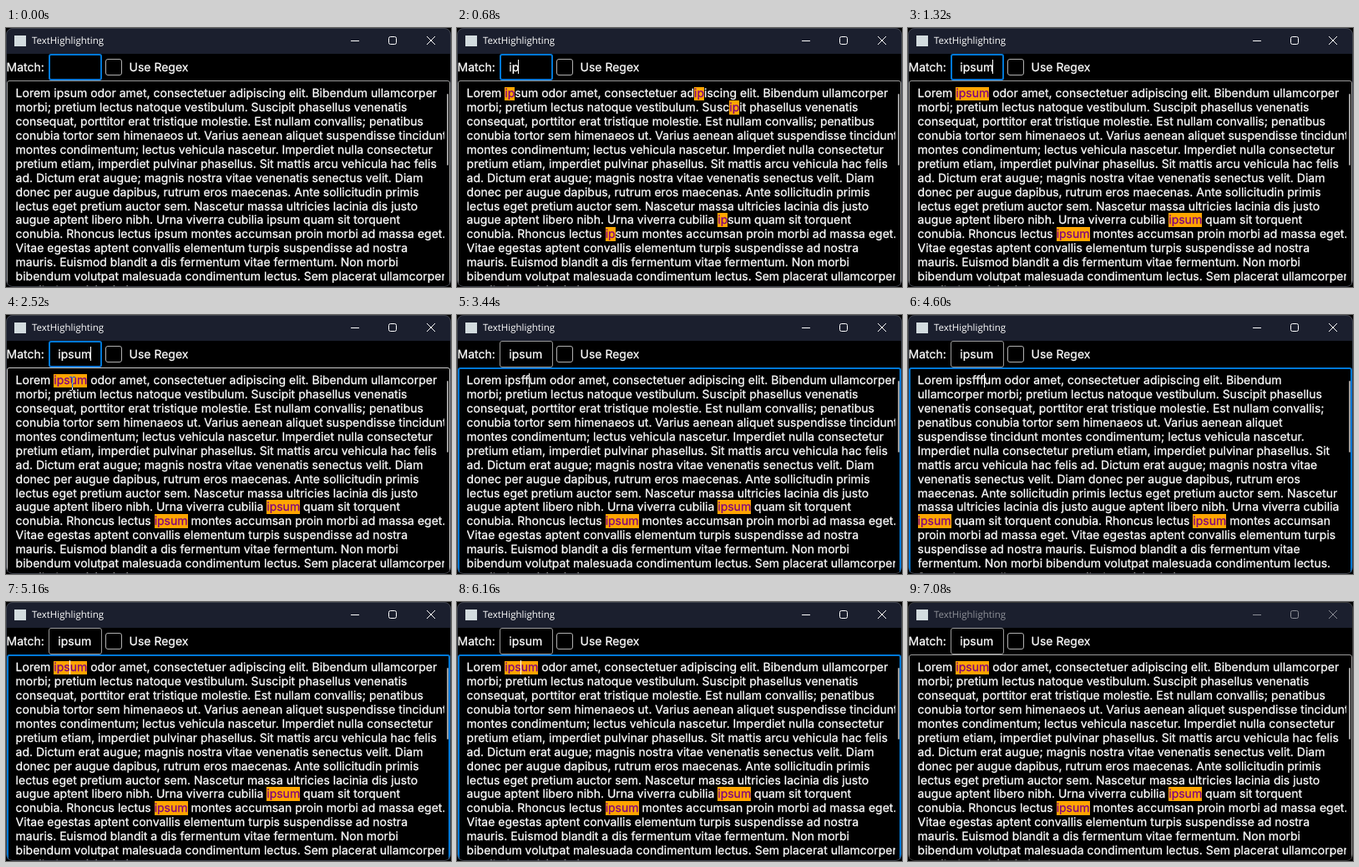
Animation of 533x311 px, one loop 7120 ms. Source, as an HTML page:

```html
<!DOCTYPE html>
<html lang="en">
<head>
<meta charset="utf-8">
<title>TextHighlighting</title>
<style>
html, body { margin: 0; width: 100%; height: 100%; overflow: hidden; background: #000; }
#win {
  position: relative; width: 533px; height: 311px; overflow: hidden; isolation: isolate;
  background: #000; color: #fff; font: 14px/17px Inter, sans-serif;
  text-rendering: geometricPrecision; white-space: pre; -webkit-text-stroke: .25px;
}
#win div, #win svg, pre { position: absolute; box-sizing: border-box; }
#bar { left: 0; top: 0; width: 533px; height: 31px; background: #1b1f2e; }
#icon { left: 10px; top: 9px; width: 14px; height: 13px; background: #d3dcdf; }
#title { left: 31px; top: 8px; font: 11.5px/16px "Open Sans", sans-serif; -webkit-text-stroke: 0; }
#buttons { left: 0; top: 0; fill: none; stroke: #fff; }
.field { border: 1px solid #999; border-radius: 3px; }
.hover { border-color: #ccc; }
.focus { border: 2px solid #0078d7; }
#box { left: 51px; top: 31px; width: 64px; height: 32px; }
#check { left: 119px; top: 37px; width: 20px; height: 20px; border-color: #b0b0b0; }
#editor { left: 1px; top: 63px; width: 531px; height: 260px; }
#thumb { left: 528px; top: 79px; width: 2px; height: 86px; border-radius: 1px; background: #9a9a9a; }
.label { top: 39px; }
pre {
  left: 11.6px; top: 71px; width: 513.4px; height: 239px; margin: 0; overflow: hidden;
  font: inherit; line-height: 16.94px;
}
mark { background: #ffa500; color: #800080; }
.caret { width: 1px; height: 17px; background: #fff; }
#boxCaret { display: inline-block; position: static !important; margin: -1px 0 0 -.8px; vertical-align: top; }
#editCaret { top: 70px; }
#beam, #arrow { left: 0; top: 0; }
#beam { mix-blend-mode: difference; fill: none; stroke: #fff; }
#arrow { fill: #fff; stroke: #000; }
#frame { inset: 0; border: 1px solid #3f424c; border-radius: 8px; box-shadow: 0 0 0 9px #000; }
</style>
</head>
<body>
<div id="win">
  <div id="bar"></div><div id="icon"></div><div id="title">TextHighlighting</div>
  <svg id="buttons" width="533" height="31">
    <path d="M413 15.5h10M504 10l10 10M514 10l-10 10"/>
    <rect x="458.5" y="10.5" width="9" height="9" rx="2"/>
  </svg>
  <div class="label" style="left:.6px">Match:</div>
  <div id="box" class="field"></div>
  <div class="label" style="left:62.3px"><span id="query"></span><div id="boxCaret" class="caret"></div></div>
  <div id="check" class="field"></div>
  <div class="label" style="left:147.5px">Use Regex</div>
  <div id="editor" class="field"></div>
  <pre id="text"></pre>
  <div id="thumb"></div>
  <div id="editCaret" class="caret"></div>
  <svg id="beam" width="7" height="17"><path d="M0 .5h3M4 .5h3M3.5 1v15M0 16.5h3M4 16.5h3"/></svg>
  <svg id="arrow" width="13" height="20"><path d="M.5 .5v16l3.7-3.5 2.6 6 2.4-1-2.6-5.8h5.2z"/></svg>
  <div id="frame"></div>
</div>
<script>
// "|" breaks the lines of the normal layout, "/" those of the layout with a longer first line.
const PROSE = 'Lorem ips@um odor amet, consectetuer adipiscing elit. Bibendum/ullamcorper|' +
  'morbi; pretium lectus natoque vestibulum. Suscipit phasellus/venenatis|' +
  'consequat, porttitor erat tristique molestie. Est nullam convallis;/penatibus|' +
  'conubia tortor sem himenaeos ut. Varius aenean aliquet/suspendisse tincidunt|' +
  'montes condimentum; lectus vehicula nascetur./Imperdiet nulla consectetur|' +
  'pretium etiam, imperdiet pulvinar phasellus. Sit/mattis arcu vehicula hac felis|' +
  'ad. Dictum erat augue; magnis nostra vitae/venenatis senectus velit. Diam|' +
  'donec per augue dapibus, rutrum eros/maecenas. Ante sollicitudin primis|' +
  'lectus eget pretium auctor sem. Nascetur/massa ultricies lacinia dis justo|' +
  'augue aptent libero nibh. Urna viverra cubilia/ipsum quam sit torquent|' +
  'conubia. Rhoncus lectus ipsum montes accumsan/proin morbi ad massa eget.|' +
  'Vitae egestas aptent convallis elementum turpis/suspendisse ad nostra|' +
  'mauris. Euismod blandit a dis fermentum vitae/fermentum. Non morbi|' +
  'bibendum volutpat malesuada condimentum lectus./Sem placerat ullamcorper|' +
  'vestibulum nisi primis.';
const LOOP = 7120, CLICK = 2680, BLUR = 7040;
const QUERY_KEYS = [400, 680, 1000, 1120, 1320];
const ADD_KEYS = [3240, 3440, 3720, 3920], DEL_KEYS = [4600, 4760, 4960, 5160];
const CARET_OFF = [[0, 80], [1800, 2280], [3200, 3240], [4400, 4600], [5720, 6160], [6680, LOOP]];

const $ = id => document.getElementById(id);
const show = (id, on) => $(id).style.visibility = on ? 'visible' : 'hidden';
const count = (times, t) => times.filter(x => x <= t).length;
const mix = (a, b, k) => a + (b - a) * k;

function layout(query, extra) {
  const long = extra > 2;
  const text = PROSE.replace('@', 'f'.repeat(extra))
    .replaceAll('|', long ? ' ' : '\n').replaceAll('/', long ? '\n' : ' ');
  return query ? text.replaceAll(query, '<mark>$&</mark>') : text;
}

function pointer(t) {
  if (t < 2000 || t >= 3200) return null;
  if (t < 2960) {
    const k = 1 - (1 - Math.min(1, (t - 2000) / 520)) ** 3;
    const nudge = t >= 2720 ? 2 : 0;
    return [mix(150, 79, k) - nudge, mix(2, 82, k) - nudge];
  }
  const k = (t - 2960) / 200;
  return [mix(77, 8, k), mix(80, 263, k)];
}

function drawPointer(p) {
  const [x, y] = p ? p.map(Math.round) : [0, 0];
  const inBox = y >= 31 && x >= 51 && x < 115;
  const beam = y >= 63 || inBox;
  show('beam', p && beam);
  show('arrow', p && !beam);
  $('editor').classList.toggle('hover', y >= 63);
  $('beam').style.transform = `translate(${x - 3}px, ${y - 8}px)`;
  $('arrow').style.transform = `translate(${x}px, ${y}px)`;
}

let drawn = '';
function draw(t) {
  const query = 'ipsum'.slice(0, count(QUERY_KEYS, t));
  const extra = count(ADD_KEYS, t) - count(DEL_KEYS, t);
  const key = query + extra;
  if (key !== drawn) {
    drawn = key;
    $('query').textContent = query;
    $('text').innerHTML = layout(query, extra);
  }
  const editing = t >= CLICK, active = t < BLUR;
  const caret = !CARET_OFF.some(([a, b]) => t >= a && t < b);
  $('box').classList.toggle('focus', !editing);
  $('editor').classList.toggle('focus', editing && active);
  show('boxCaret', caret && !editing);
  show('editCaret', caret && editing);
  $('editCaret').style.left = 76 + 5 * extra + 'px';
  $('title').style.opacity = $('buttons').style.opacity = active ? 1 : t < BLUR + 40 ? .75 : .5;
  $('frame').style.borderColor = active ? '#3f424c' : '#393939';
  drawPointer(pointer(t));
}

const start = performance.now();
function tick() {
  const t = (performance.now() - start) % LOOP;
  draw(Math.floor(t / 40) * 40);
  requestAnimationFrame(tick);
}
tick();
</script>
</body>
</html>
```
